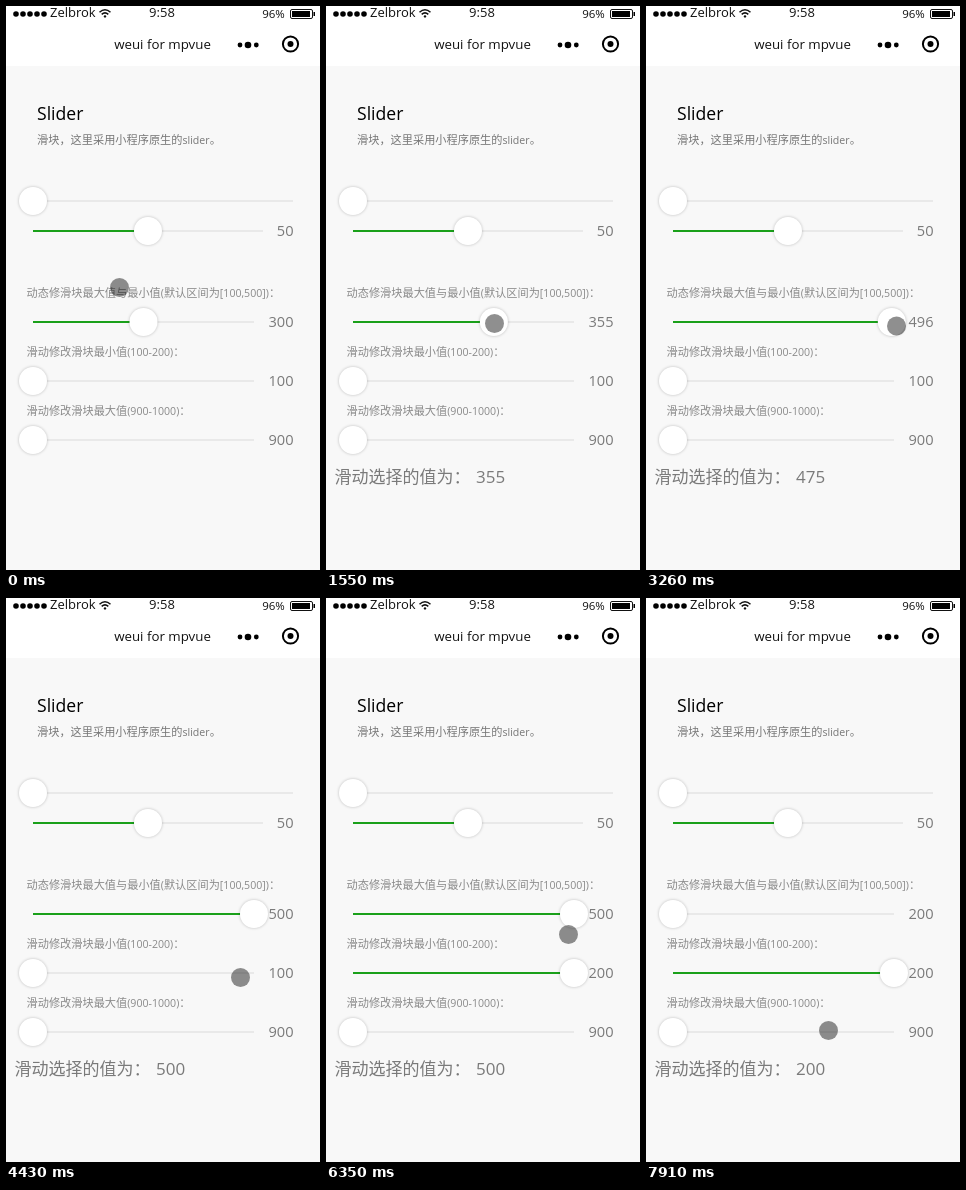
These frames come from a looping animation (314x564 px, 7.99 s). An HTML page:

```html
<!DOCTYPE html>
<html lang="zh">
<head>
<meta charset="utf-8">
<title>Slider</title>
<style>
  html, body { margin: 0; width: 100%; height: 100%; overflow: hidden; background: #f8f8f8; }
  svg { display: block; font-family: "Open Sans", "Noto Sans CJK SC", "Noto Sans CJK", sans-serif; }
  text { white-space: pre; }
  .bar { font-size: 13px; fill: #111; }
  .mid { text-anchor: middle; }
  .note { font-size: 11.2px; fill: #8a8a8a; }
  .num { font-size: 14.6px; fill: #7a7a7a; text-anchor: end; }
  .track { fill: #e9e9e9; }
  .fill { fill: #1aa01a; }
  .thumb { fill: #fff; filter: drop-shadow(0 0 1.8px rgba(0, 0, 0, .24)); }
  #result { font-size: 17px; fill: #7a7a7a; }
</style>
</head>
<body>
<svg id="stage" width="314" height="564" viewBox="0 0 314 564">
  <rect width="314" height="564" fill="#f8f8f8"/>
  <rect width="314" height="60" fill="#fff"/>
  <path d="M10 8h29" stroke="#000" stroke-width="5.6" stroke-linecap="round" stroke-dasharray="0 7"/>
  <text class="bar" x="44" y="11">Zelbrok</text>
  <g fill="none" stroke="#111" stroke-width="1.5">
    <path d="M93.5 6.3Q99 1.2 104.5 6.3M95.7 8.4Q99 5.4 102.3 8.4"/>
    <circle cx="99" cy="10.4" r="1.2" fill="#111" stroke="none"/>
    <rect x="284.5" y="3.5" width="22" height="9" rx="1.5" stroke-width="1"/>
  </g>
  <path d="M286 5h18v6h-18zM307.5 6h1.5v4h-1.500z"/>
  <text class="bar mid" x="156" y="11">9:58</text>
  <text class="bar mid" x="267.5" y="12" style="font-size: 11.5px">96%</text>
  <text class="bar mid" x="156.5" y="43" style="font-size: 13.3px">weui for mpvue</text>
  <circle cx="234" cy="39" r="2.4"/>
  <circle cx="242" cy="39" r="3.3"/>
  <circle cx="250.3" cy="39" r="2.4"/>
  <circle cx="284.5" cy="38" r="7.6" fill="none" stroke="#000" stroke-width="2"/>
  <circle cx="284.5" cy="38" r="3"/>
  <text x="31" y="114" font-size="17.6">Slider</text>
  <g id="page"></g>
  <g id="result">
    <text x="8.5" y="477">滑动选择的值为：</text>
    <text id="picked" x="150" y="477"></text>
  </g>
  <circle id="cursor" r="9.5" fill="#000" fill-opacity=".44"/>
</svg>
<script>
const $ = id => document.getElementById(id);
const LEFT = 27, ROW = 59, FRAME = 76, LOOP = 7990;

function add(parent, tag, attrs, text) {
  const el = document.createElementNS("http://www.w3.org/2000/svg", tag);
  for (const k in attrs) el.setAttribute(k, attrs[k]);
  if (text !== undefined) el.textContent = text;
  return parent.appendChild(el);
}

// Latin runs are set slightly smaller than the Chinese around them.
function note(x, y, str) {
  const el = add($("page"), "text", { x, y, class: "note" });
  for (const run of str.match(/[ -~]+|[^ -~]+/g))
    add(el, "tspan", run[0] <= "~" ? { "font-size": "10.6px" } : {}, run);
  return el;
}

function slider(y, end, value, part) {
  const g = $("page"), line = { x: LEFT, y: y - 1, height: 2 };
  add(g, "rect", { ...line, width: end - LEFT, class: "track" });
  const fill = add(g, "rect", { ...line, class: "fill" });
  const thumb = add(g, "circle", { cy: y, r: 14, class: "thumb" });
  const num = add(g, "text", { x: 287.5, y: y + 5, class: "num" });
  const set = (value, part) => {
    const w = part * (end - LEFT);
    fill.setAttribute("width", w);
    thumb.setAttribute("cx", LEFT + w);
    num.textContent = value;
  };
  set(value, part);
  return set;
}

note(31, 138, "滑块，这里采用小程序原生的slider。").style.fill = "#777";
slider(195, 287, "", 0);
slider(225, 257, 50, .5);
const [setMain, setMin] = [
  ["动态修滑块最大值与最小值(默认区间为[100,500])：", 300, .5],
  ["滑动修改滑块最小值(100-200)：", 100, 0],
  ["滑动修改滑块最大值(900-1000)：", 900, 0]
].map(([label, value, part], i) => {
  note(20.5, 291 + ROW * i, label);
  return slider(316 + ROW * i, 248, value, part);
});

let state = { t: 0, x: 113.5, y: 281.5, main: 300, min: 100, text: "" };
const steps = [state];
const push = change => steps.push(state = { ...state, ...change });

function move(t0, t1, x, y, values) {
  const from = state, goal = { x, y, ...values };
  const n = Math.round((t1 - t0) / FRAME) + 1;
  for (let k = 1; k <= n; k++) {
    const pose = { t: t0 + (t1 - t0) * (k - 1) / (n - 1 || 1) };
    for (const key in goal) pose[key] = from[key] + (goal[key] - from[key]) * k / n;
    push(pose);
  }
}

function tap(t, name) {
  const [lo, hi] = name === "main" ? [state.min, 500] : [100, 200];
  push({ t, [name]: Math.round(lo + (hi - lo) * (state.x - LEFT - .5) / 221) });
}

const release = t => push({ t, text: state.main });

move(70, 460, 131, 313);
move(610, 840, 226.5, 312.5, { main: 462 });
release(1010);
move(1010, 1310, 168.5, 317.5);
tap(1550, "main");
release(1550);
move(1620, 1700, 224, 318);
move(1930, 2080, 234.5, 319);
tap(2330, "main");
release(2330);
move(2720, 3260, 250.5, 320, { main: 496 });
move(3330, 3500, 221, 347, { main: 500 });
release(3500);
move(3570, 3650, 207, 371);
move(3820, 4430, 234.5, 379.5);
tap(4660, "min");
move(5140, 5350, 221, 384);
move(5420, 5570, 228, 378);
move(5820, 5970, 244, 373.5, { min: 200 });
move(6200, 6350, 242.5, 336.5);
move(6440, 6670, 263, 321);
move(6820, 7130, -12, 339, { main: 200 });
release(7360);
move(7680, 7680, 54, 397);
move(7760, 7910, 182.5, 432.5);

let shown;
function draw(t) {
  const s = steps.findLast(step => step.t <= t + .5);
  if (s === shown) return;
  shown = s;
  setMain(Math.round(s.main), (s.main - s.min) / (500 - s.min));
  setMin(Math.round(s.min), (s.min - 100) / 100);
  $("result").style.display = s.text ? "" : "none";
  $("picked").textContent = s.text;
  $("cursor").setAttribute("cx", s.x);
  $("cursor").setAttribute("cy", s.y);
}

const start = performance.now();
function tick() {
  draw((performance.now() - start) % LOOP);
  requestAnimationFrame(tick);
}
tick();
</script>
</body>
</html>
```
